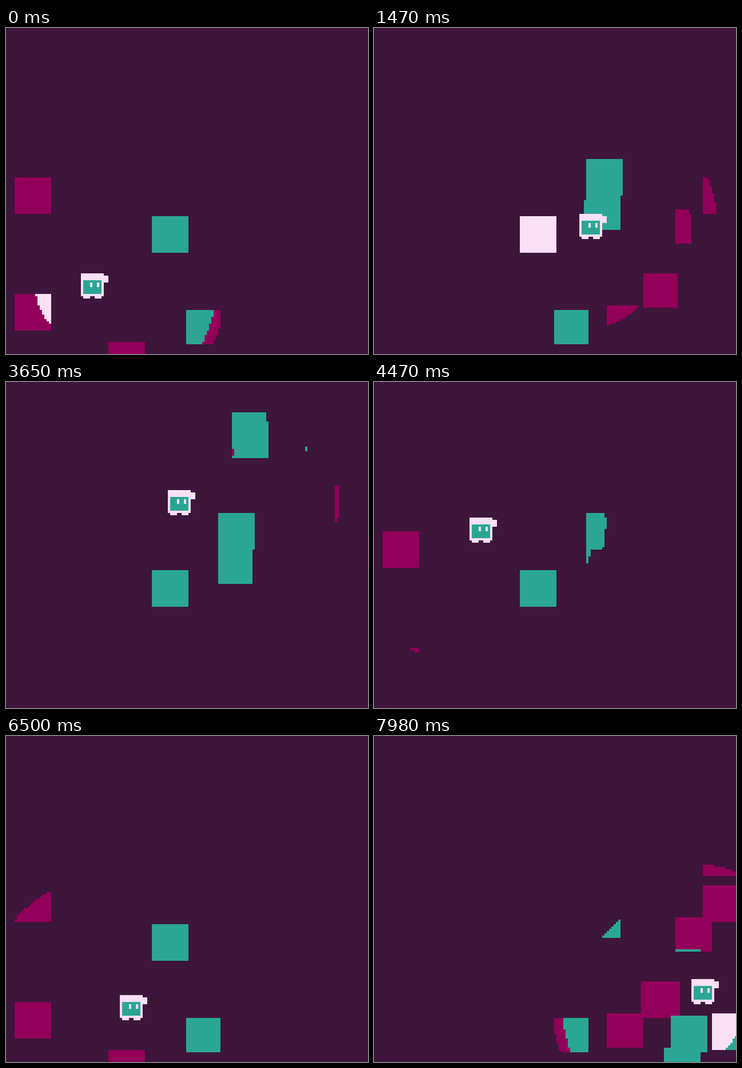
Write an HTML page with a canvas that moves like this. It is 633x570 px and loops after 8 s.

```html
<!DOCTYPE html>
<html lang="en">
<head>
<meta charset="utf-8">
<title>Lantern walk</title>
<style>
html, body { margin: 0; width: 100%; height: 100%; overflow: hidden; background: #3e153b; }
canvas { display: block; }
</style>
</head>
<body>
<canvas id="stage" width="633" height="570"></canvas>
<script>
const ctx = document.getElementById('stage').getContext('2d');
const LOOP = 8000, STEP = 54.4, START = 480, LAG = 125, CELL = 4;
const NEAR = 100, FAR = 217, RIM = 17;
const BACK = '#3e153b', PLUM = '#930059', TEAL = '#2ba695', PALE = '#f9e0f5';

// time, left, top of the walker
const path = [
  [0, 131, 429], [480, 131, 429], [1470, 363, 325], [1880, 459, 283],
  [2400, 459, 157], [2600, 459, 113], [2860, 459, 161], [3650, 279, 189],
  [4060, 187, 205], [4600, 159, 249], [5200, 23, 353], [5710, 23, 353],
  [6130, 119, 453], [7810, 527, 453], [8000, 571, 409]
];

function rect(color, x, y, w, h) {
  ctx.fillStyle = color;
  ctx.fillRect(x, y, w, h);
}

function place(t) {
  t = Math.max(0, t);
  let i = 1;
  while (i < path.length - 1 && path[i][0] < t) i++;
  const [t0, x0, y0] = path[i - 1], [t1, x1, y1] = path[i];
  const k = (t - t0) / (t1 - t0);
  return [x0 + (x1 - x0) * k, y0 + (y1 - y0) * k];
}

// draws the cells of a block that lie within reach of the light
function lit(color, light, x, y, reach, w = 64, h = 64) {
  for (let v = y; v < y + h; v += CELL) {
    for (let u = x; u < x + w; u += CELL) {
      if (Math.hypot(u + 2 - light.x, v + 2 - light.y) < reach) rect(color, u, v, CELL, CELL);
    }
  }
}

function drawBlocks(light) {
  const plum = (...b) => lit(PLUM, light, ...b);
  const teal = (...b) => lit(TEAL, light, ...b);
  const pale = (x, y, w) => lit(PALE, light, x, y, NEAR, w);
  const rimmed = (x, y, w, h) => {
    plum(x, y, FAR + RIM, w, h);
    teal(x, y, FAR, w, h);
  };

  plum(15, 261, 232);
  plum(15, 465, 255);
  plum(179, 549, 215);
  plum(575, 181, 252);
  plum(575, 261, 252);
  plum(527, 317, 205, 64, 60);
  plum(467, 429, NEAR + RIM, 68);
  plum(471, 429, 243, 60, 60);
  plum(407, 485, 170, 64, 60);

  plum(395, 69, NEAR + RIM, 68);
  teal(395, 69, NEAR, 68);
  rimmed(255, 329);
  rimmed(315, 493, 60, 60);
  rimmed(395, 53, 60);
  rimmed(399, 69, 60);
  teal(367, 301, 80, 64, 52);
  teal(371, 229, 212);
  teal(371, 289, 192, 60);
  teal(523, 57, 215);
  teal(527, 317, NEAR + 2, 64, 60);
  teal(507, 545, 200);
  teal(519, 489, 200);
  teal(591, 485, 200);

  pale(15, 465);
  pale(255, 329);
  pale(399, 69, 60);
  pale(591, 485);
}

function drawWalker(x, y) {
  rect(PALE, x, y, 40, 40);
  rect(PALE, x + 40, y + 4, 8, 12);
  rect(TEAL, x + 4, y + 12, 32, 24);
  for (const foot of [4, 24]) rect(PALE, x + foot, y + 40, 12, 4);
  for (const eye of [16, 28]) rect(PALE, x + eye, y + 16, 4, 8);
}

function draw(time) {
  const t = START + Math.floor((time - START) / STEP + 0.1) * STEP;
  const [lx, ly] = place(t - LAG);
  const [x, y] = place(t);
  rect(BACK, 0, 0, 633, 570);
  drawBlocks({ x: lx + 20, y: ly + 21 });
  drawWalker(Math.round((x + 1) / CELL) * CELL - 1, Math.round((y - 1) / CELL) * CELL + 1);
}

const begin = performance.now();
function tick() {
  draw((performance.now() - begin) % LOOP);
  requestAnimationFrame(tick);
}
tick();
</script>
</body>
</html>
```
